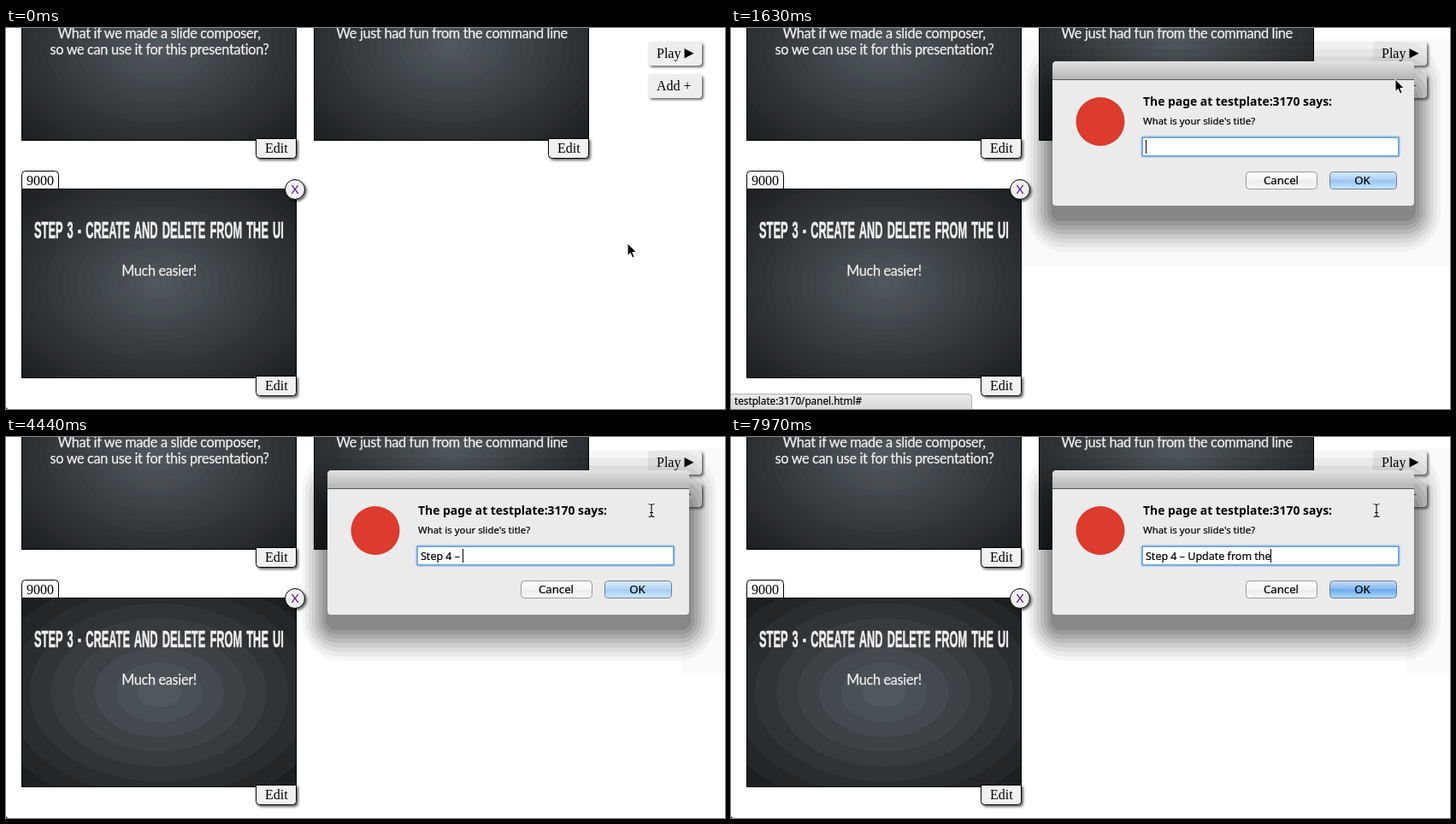
Animation, 841 px wide and 446 px high, one loop 8 s. Source, as an HTML page:

```html
<!DOCTYPE html>
<html lang="en">
<head>
<meta charset="utf-8">
<title>Slide composer</title>
<style>
html, body { margin: 0; width: 100%; height: 100%; overflow: hidden; background: #fff; }
svg { display: block; width: 841px; height: 446px; }
text { white-space: pre; }
.serif { font: 16px "Liberation Serif", serif; }
.lato { font: 16.3px Lato, sans-serif; letter-spacing: -.02em; fill: #eee; stroke: #eee; stroke-width: .25px; text-anchor: middle; }
.ui { font: 13.2px "Noto Sans", sans-serif; }
.ink { stroke: #000; stroke-width: .2px; }
.mid { text-anchor: middle; }
.lift { filter: drop-shadow(2px 2px 1.5px rgba(0,0,0,.6)); }
</style>
</head>
<body>
<svg id="stage" viewBox="0 0 841 446" xmlns="http://www.w3.org/2000/svg">
  <defs>
    <linearGradient id="bar" x2="0" y2="1"><stop stop-color="#e2e2e2"/><stop offset="1" stop-color="#b4b4b4"/></linearGradient>
    <linearGradient id="plain" x2="0" y2="1"><stop stop-color="#fff"/><stop offset=".5" stop-color="#f3f3f3"/><stop offset=".52" stop-color="#ebebeb"/><stop offset="1" stop-color="#fbfbfb"/></linearGradient>
    <linearGradient id="blue" x2="0" y2="1"><stop stop-color="#c9dff6"/><stop offset=".48" stop-color="#84b8ee"/><stop offset=".52" stop-color="#6aa9ea"/><stop offset="1" stop-color="#aedcff"/></linearGradient>
    <linearGradient id="status" x2="0" y2="1"><stop stop-color="#e9e9e9"/><stop offset="1" stop-color="#d9d9d9"/></linearGradient>
    <clipPath id="frame"><path d="M376 208V44q0-5 5-5h413q5 0 5 5V204q0 4-4 4H380q-4 0-4-4z"/></clipPath>
  </defs>
  <rect width="841" height="446" fill="#fff"/>
  <rect id="pale" y="13" height="265" fill="#fafafa"/>
  <g id="slides"></g>
  <g class="lato">
    <text x="179" y="12">What if we made a slide composer,</text>
    <text x="179.500" y="31">so we can use it for this presentation?</text>
    <text x="521.500" y="12">We just had fun from the command line</text>
    <text x="179" y="290">Much easier!</text>
  </g>
  <text transform="translate(179 246) scale(.475 1)" class="mid" fill="#eee" stroke="#eee" stroke-width=".7"
    style="font:bold 27px 'Liberation Sans',sans-serif;word-spacing:3.400px">STEP 3 - CREATE AND DELETE FROM THE UI</text>
  <g id="edits" class="serif"></g>
  <path d="M18.500 188.500V171.500q0-4 4-4H57.500q4 0 4 4V188.500z" fill="#fafafa" stroke="#000"/>
  <text x="24" y="184" class="serif">9000</text>
  <circle class="lift" cx="338" cy="189" r="11.500" fill="#efefef" stroke="#000"/>
  <text x="338" y="194" class="mid" fill="#551a8b" style="font:14px Lato,sans-serif">X</text>
  <g class="serif">
    <rect class="lift" x="751" y="16" width="63" height="28" rx="4" fill="#eee"/>
    <text x="761" y="35">Play</text>
    <path d="M793.500 24L804.500 29.800L793.500 35.500z"/>
    <rect id="add" class="lift" x="751" y="54" width="63" height="28" rx="4"/>
    <text x="761" y="73">Add +</text>
  </g>
  <path d="M0 443.500Q.5 445 2.500 446H0z" fill="#222"/>
  <g id="link">
    <path d="M-1 447V428.500H278q3.500 0 3.500 4V447z" fill="url(#status)" stroke="#b0b0b0"/>
    <text x="4" y="441" class="ink" style="font:11.700px 'Noto Sans',sans-serif">testplate:3170/panel.html#</text>
  </g>
  <g id="dialog">
    <g id="shade"></g>
    <g clip-path="url(#frame)">
      <rect x="376" y="39" width="423" height="169" fill="#ebebeb"/>
      <rect x="376" y="39" width="423" height="21" fill="url(#bar)"/>
      <rect x="376" y="60" width="423" height="1" fill="#5c5c5c"/>
    </g>
    <circle cx="432" cy="109.500" r="28.500" fill="#dc3b2e"/>
    <text x="482" y="91" style="font:bold 13.900px 'Noto Sans',sans-serif">The page at testplate:3170 says:</text>
    <text x="482" y="113" class="ink" style="font:11.450px 'Noto Sans',sans-serif">What is your slide's title?</text>
    <rect x="480.500" y="127.500" width="301" height="23" rx="2" fill="#fff" stroke="#86b5e6" stroke-width="2"/>
    <rect x="481.500" y="128.500" width="299" height="21" fill="#fff" stroke="#6a9fd6"/>
    <text id="typed" class="ink" x="485" y="144" style="font:12.500px 'Noto Sans',sans-serif"></text>
    <rect id="caret" y="131" width="1" height="16"/>
    <rect x="602.500" y="168.500" width="83" height="20" rx="4" fill="url(#plain)" stroke="#999"/>
    <text x="643.500" y="183" class="ui mid ink">Cancel</text>
    <rect x="700.500" y="168.500" width="78" height="20" rx="4" fill="url(#blue)" stroke="#6d7f98"/>
    <rect id="glow" x="701" y="169" width="77" height="19" rx="3.500" fill="#fff"/>
    <text x="738.500" y="183" class="ui mid ink">OK</text>
  </g>
  <path id="arrow" d="M0 0V14.500L3.300 11.400L5.700 17L8.200 16L5.800 10.500H10.300z" fill="#000" stroke="#fff" stroke-width="1"/>
  <g id="beam" fill="none">
    <path d="M-3.500-7.500Q-.5-7.500 0-6Q.5-7.500 3.500-7.500M0-6V6M-3.500 7.500Q-.5 7.500 0 6Q.5 7.500 3.500 7.500M-2 2.500H2" stroke="#fff" stroke-width="2.600"/>
    <path d="M-3.500-7.500Q-.5-7.500 0-6Q.5-7.500 3.500-7.500M0-6V6M-3.500 7.500Q-.5 7.500 0 6Q.5 7.500 3.500 7.500M-2 2.500H2" stroke="#111" stroke-width="1.200"/>
  </g>
</svg>
<script>
const NS = 'http://www.w3.org/2000/svg';
const $ = id => document.getElementById(id);
const LOOP = 8000;

function add(parent, tag, attrs, text) {
  const el = document.createElementNS(NS, tag);
  for (const k in attrs) el.setAttribute(k, attrs[k]);
  if (text) el.textContent = text;
  return parent.appendChild(el);
}
const set = (id, attrs) => { for (const k in attrs) $(id).setAttribute(k, attrs[k]); };
const show = (id, on) => set(id, { visibility: on ? 'visible' : 'hidden' });

// Radial gradient cut into n flat bands
function bands(id, n) {
  const g = add(document.querySelector('defs'), 'radialGradient', { id, r: .707 });
  for (let i = 0; i < n; i++) {
    const k = i / (n - 1);
    const mix = (a, b) => Math.round(a + (b - a) * k);
    const color = `rgb(${mix(82, 29)},${mix(87, 31)},${mix(91, 33)})`;
    add(g, 'stop', { offset: i / n, 'stop-color': color });
    add(g, 'stop', { offset: (i + 1) / n, 'stop-color': color });
  }
}
bands('fine', 26);
bands('coarse', 9);

const slide = (x, y) => add($('slides'), 'rect', {
  x: x + .5, y: y + .5, width: 321, height: 221, fill: 'url(#fine)', stroke: '#000'
});
slide(18, -90);
slide(360, -90);
const lower = slide(18, 188);

for (const [x, y] of [[292, 130], [634, 130], [292, 408]]) {
  add($('edits'), 'path', {
    class: 'lift', fill: '#f1f1f1', stroke: '#000',
    d: `M${x + .5} ${y - .5}h47v19q0 4-4 4h-39q-4 0-4-4z`
  });
  add($('edits'), 'text', { x: x + 11, y: y + 16 }, 'Edit');
}

// Soft shadow in steps, falling downwards
for (let i = 0; i < 8; i++) {
  const k = i / 7, x = 346 + 28 * k, y = 16 + 60 * k;
  add($('shade'), 'rect', {
    x, y, width: 830 - 29 * k - x, height: 262 - 36 * k - y,
    rx: 46 - 34 * k, opacity: .035 + .08 * k
  });
}

// Bursts: start, end, then evenly spaced states.
// A pair moves the pointer; a string is the field's text, with | for the caret.
const bursts = [
  [300, 880, [740, 222], [768, 162], [785, 105], [782, 74], [777, 60]],
  [1480, 2520, [777, 60], [777, 60], [777, 60], [775, 63], [766, 72], [758, 82], [755, 86], [755, 86]],
  [2670, 3560, 'S|', 'St|', 'Ste|', 'Step|', 'Step |', 'Step 4|', 'Step 4 |'],
  [3850, 4440, 'Step 4 ', 'Step 4 ', 'Step 4 |', 'Step 4 –|', 'Step 4 – |'],
  [4730, 5480, 'Step 4 – ', 'Step 4 – |', 'Step 4 – U|', 'Step 4 – Up|', 'Step 4 – Upd|', 'Step 4 – Upda|'],
  [5770, 6360, 'Step 4 – Upda', 'Step 4 – Upda', 'Step 4 – Upda|', 'Step 4 – Upda|', 'Step 4 – Updat|'],
  [6650, 6940, 'Step 4 – Updati|', 'Step 4 – Updat|', 'Step 4 – Update |'],
  [7240, 7970, 'Step 4 – Update f|', 'Step 4 – Update fr|', 'Step 4 – Update fro|',
    'Step 4 – Update from|', 'Step 4 – Update from t|', 'Step 4 – Update from the|']
];
const steps = bursts.flatMap(([from, to, ...states]) =>
  states.map((state, i) => ({ at: from + (to - from) * i / (states.length - 1), state })));

function draw(t) {
  let now = 0, pos = [727, 252], field = t < 2200 ? '|' : '';
  for (const { at, state } of steps) {
    if (at > t + .5) break;
    now = at;
    if (typeof state === 'string') field = state; else pos = state;
  }

  const open = now >= 1600, settled = now >= 2060, beam = now >= 2200;
  const hover = now >= 730 && !settled;
  show('arrow', !beam);
  show('beam', beam);
  set(beam ? 'beam' : 'arrow', { transform: `translate(${pos})` });
  set('add', { fill: hover ? '#fff' : '#eee' });
  show('link', hover);
  lower.setAttribute('fill', settled ? 'url(#coarse)' : 'url(#fine)');

  show('pale', open);
  set('pale', settled ? { x: 790, width: 51 } : { x: 342, width: 499 });
  $('dialog').style.display = now >= 1480 ? '' : 'none';
  set('dialog', {
    opacity: open ? 1 : .24,
    transform: open ? '' : 'translate(587.5 123.5) scale(.25) translate(-587.5 -123.5)'
  });

  const text = field.replace('|', '');
  $('typed').textContent = text;
  const width = text ? $('typed').getComputedTextLength() : 0;
  set('caret', { x: Math.floor(485 + width) });
  $('caret').style.display = field.endsWith('|') ? '' : 'none';
  set('glow', { opacity: .2 - .2 * Math.cos((now - 7970) / 1000 * 2 * Math.PI) });
}

const start = performance.now();
function tick() {
  draw((performance.now() - start) % LOOP);
  requestAnimationFrame(tick);
}
tick();
</script>
</body>
</html>
```
